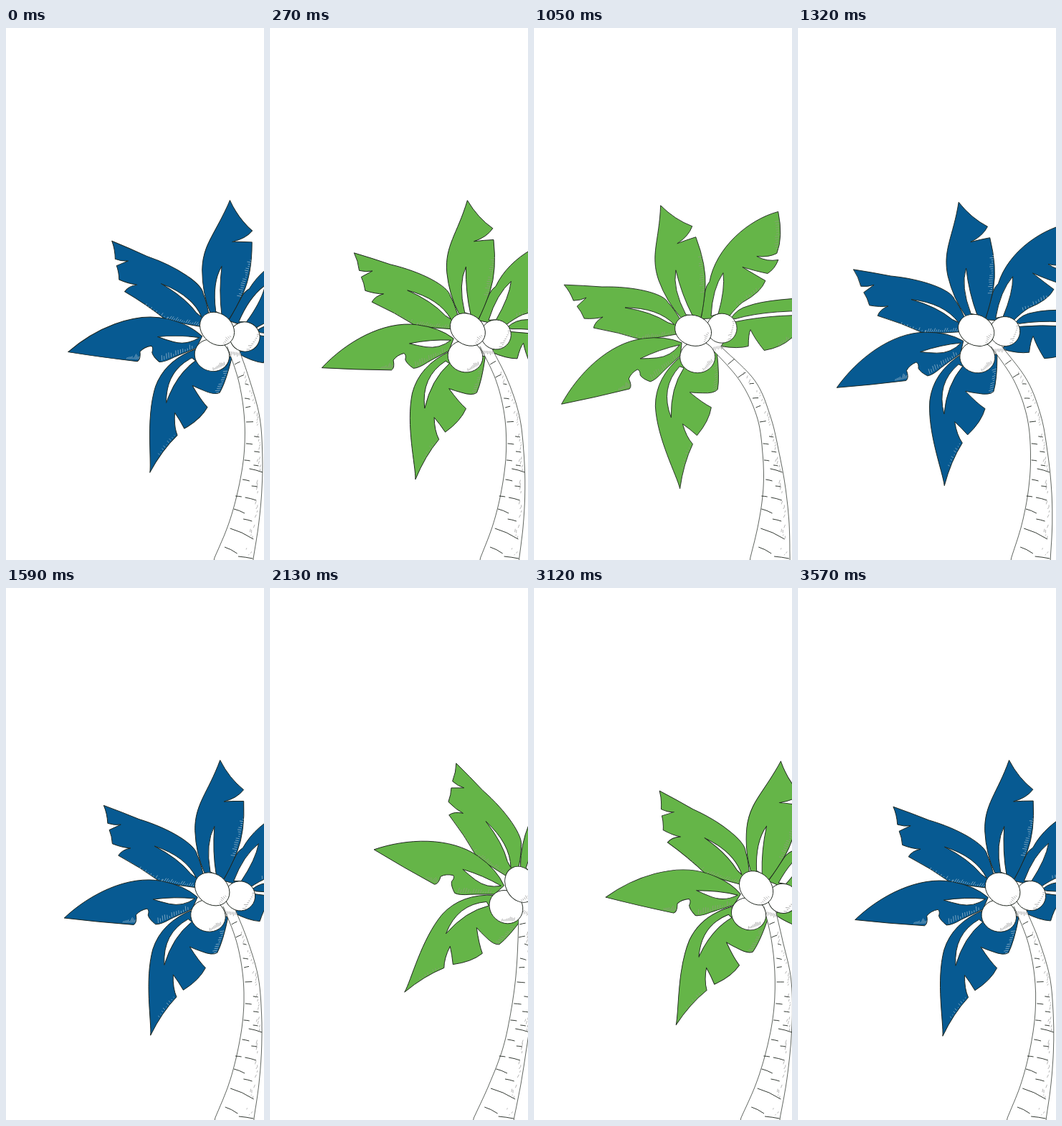
Recreate the animation shown at these times as an HTML page. Size 360 px wide and 740 px high, loop 3600 ms.

```html
<!DOCTYPE html>
<html lang="en">
<head>
<meta charset="utf-8">
<title>Swaying palm</title>
<style>
  html, body { margin: 0; width: 100%; height: 100%; overflow: hidden; background: #fff; }
  svg { display: block; width: 360px; height: 740px; }
  path, ellipse { stroke: #1d241d; stroke-width: .9; stroke-linejoin: round; fill: none; }
  .leaf { fill: var(--leaf); }
  .white { fill: #fff; }
  .hatch { stroke: var(--hatch); stroke-width: .6; }
  .shade { stroke: #858585; stroke-width: .6; }
  svg { --leaf: #65b548; --hatch: #969a86; }
  svg.blue { --leaf: #075a92; --hatch: #b4c8d6; }
</style>
</head>
<body>
<svg id="stage" viewBox="0 0 360 740">
  <g class="crown">
    <path class="leaf" d="M276,403Q284,390 300,386Q330,375 420,374L420,394Q330,390 282,404Z"/>
    <path class="leaf" d="M262,442Q285,446 300,442Q300,425 303,419Q309,432 322,448Q346,444 360,431L420,400Q340,396 282,408Z"/>
    <path class="leaf" d="M204,640C200,622 172,570 170,525Q170,485 207,455L256,450Q260,485 257,502Q252,508 236,507Q228,507 218,506Q236,521 248,527Q245,546 228,566Q218,557 208,550Q213,568 222,578Q209,605 204,640Z"/>
    <path class="white" d="M192,541Q191,500 210,472L204,470Q176,500 192,541Z"/>
    <path class="leaf" d="M43,356Q70,357 96,359C140,358 182,368 188,381Q195,388 204,403L206,424Q180,429 152,433Q118,422 84,416Q86,407 97,401Q86,404 71,403Q67,393 61,386L74,374Q66,378 56,378Q51,365 43,356Z"/>
    <path class="white" d="M128,388Q174,388 197,412L188,409Q165,394 128,388Z"/>
    <path class="leaf" d="M39,522C62,480 105,437 153,431Q184,427 207,437L205,455Q186,472 180,478Q170,489 163,491Q152,487 149,482Q149,475 145,474Q136,479 133,487Q138,497 134,501Q85,513 39,522Z"/>
    <path class="white" d="M149,459Q176,446 204,440Q192,456 172,458Q160,459 149,459Z"/>
    <path class="leaf" d="M342,255C300,266 255,305 246,352Q241,358 240,365L234,404L272,402Q283,388 292,381Q318,367 324,351Q310,343 292,332Q312,338 327,341Q337,335 342,322Q326,325 312,317Q328,319 340,313Q349,290 342,255Z"/>
    <path class="white" d="M265,340Q268,362 258,397L248,400Q250,362 265,340Z"/>
    <path class="leaf" d="M178,246Q198,266 222,275Q217,289 201,299Q214,294 227,290Q242,330 240,360Q238,385 234,402L206,402Q186,380 175,350C163,315 176,295 178,246Z"/>
    <path class="white" d="M199,336Q207,370 222,399L213,398Q194,362 199,336Z"/>
    <path class="hatch" id="leafHatch"/>
  </g>
  <path class="white" id="trunk" style="stroke-width:.7"/>
  <path id="rings" style="stroke-width:.9"/>
  <path class="shade" id="bark"/>
  <g class="crown">
    <ellipse class="white" cx="263" cy="417" rx="21" ry="20.5"/>
    <ellipse class="white" cx="229" cy="457" rx="24.5" ry="22"/>
    <ellipse class="white" rx="26" ry="21" transform="translate(223 420) rotate(20)"/>
    <path class="shade" id="nutHatch"/>
  </g>
</svg>
<script>
const LOOP = 3600, STEP = 30;
const $ = id => document.getElementById(id);
const stage = $('stage'), crowns = document.querySelectorAll('.crown');

function random(seed) {
  return () => (seed = (seed * 16807) % 2147483647) / 2147483647;
}

// A row of n short strokes (dx, dy) along a straight line
const rnd = random(77);
function hatch([x1, y1, x2, y2, dx, dy, n]) {
  let d = '';
  for (let i = 0; i < n; i++) {
    const k = i / (n - 1), len = .3 + .7 * rnd();
    const x = x1 + (x2 - x1) * k, y = y1 + (y2 - y1) * k;
    d += `M${x.toFixed(1)},${y.toFixed(1)}l${(dx * len).toFixed(1)},${(dy * len).toFixed(1)}`;
  }
  return d;
}

$('leafHatch').setAttribute('d', [
  [119, 503, 134, 498, 1, -9, 9],
  [166, 488, 200, 458, -3, -7, 14],
  [118, 424, 152, 431, 1, -4, 9],
  [153, 431, 202, 424, 2, -7, 18],
  [235, 314, 239, 366, -6, 1, 18],
  [343, 268, 342, 306, -6, 1, 12],
  [285, 385, 316, 364, -2, -5, 10],
  [257, 470, 256, 502, -6, 3, 11],
  [219, 580, 208, 612, -4, -2, 9],
  [343, 442, 356, 433, -1, -6, 7]
].map(hatch).join(''));

$('nutHatch').setAttribute('d', [
  [281, 407, 276, 431, -6, 2, 9],
  [245, 424, 240, 436, -5, -2, 6],
  [250, 464, 238, 476, -3, -6, 9],
  [251, 443, 266, 440, 1, 6, 8]
].map(hatch).join(''));

// Trunk edges, every 50px from y = 440, for leaning left, upright and leaning right
const LEAN = [-17.3, 0, 25];
const LEFT = [
  [243, 287, 311, 319, 320, 313, 301],
  [300, 320, 330, 331, 324, 311, 291],
  [347, 346, 343, 336, 325, 306, 283]
];
const RIGHT = [
  [258, 308, 330, 342, 351, 356, 357],
  [315, 336, 351, 356, 356.5, 353, 346],
  [363, 364, 367, 365, 358, 350, 340]
];

const weights = a => LEAN.map((p, i) =>
  LEAN.reduce((w, q, j) => i === j ? w : w * (a - q) / (p - q), 1));

function edge(side, y, w) {
  const s = Math.min(5.999, (y - 440) / 50), i = Math.floor(s), f = s - i;
  const at = k => {
    if (k < 0) return 2 * at(0) - at(1);
    if (k > 6) return 2 * at(6) - at(5);
    return side.reduce((sum, row, n) => sum + row[k] * w[n], 0);
  };
  const [p, q, r, t] = [i - 1, i, i + 1, i + 2].map(at);
  return q + f * (r - p + f * (2 * p - 5 * q + 4 * r - t + f * (3 * (q - r) + t - p))) / 2;
}

// Bark lines: y, start and end across the trunk, drop
const RINGS = [
  [468, .1, .6, -2], [486, .05, .55, -2], [495, .5, .8, 2], [515, .2, .6, 2],
  [528, .15, .5, -1], [548, .1, .55, 0], [568, .55, .85, 1], [578, .08, .45, 1],
  [589, .55, .85, 1], [601, .05, .35, 1], [608, .55, .8, 1], [613, .35, 1, 5],
  [628, .1, .42, 2], [637, .55, .8, 1], [651, -.05, .2, 1], [653, .35, .8, 4],
  [669, .02, .42, 6], [683, .45, .75, 3], [696, .1, .85, 15], [722, .15, .5, 9],
  [735, .6, .98, 3]
];

const barkRnd = random(412);
const BARK = Array.from({ length: 64 }, (_, i) => {
  const y = 478 + i * 4 + barkRnd() * 3;
  return { y, u: .74 + .2 * barkRnd(), dx: 2 * barkRnd() - 2, dy: 1 + 4 * barkRnd() };
}).filter(b => Math.sin(b.y / 5) > -.5);

function drawTrunk(a) {
  const w = weights(a);
  const left = [], right = [];
  for (let y = 443; y <= 743; y += 6) {
    left.push(`${edge(LEFT, y, w).toFixed(1)},${y}`);
    right.unshift(`${edge(RIGHT, y, w).toFixed(1)},${y}`);
  }
  $('trunk').setAttribute('d', 'M' + left.concat(right).join('L'));
  const across = (u, y) => {
    const l = edge(LEFT, y, w);
    return l + (edge(RIGHT, y, w) - l) * u;
  };
  // Rings stay square to the trunk where it leans
  const slope = y => (edge(LEFT, y + 10, w) - edge(LEFT, y, w)) / 10;
  $('rings').setAttribute('d', RINGS.map(([y, u, v, dy]) => {
    const x1 = across(u, y), x2 = across(v, y);
    const end = y + dy - (y < 560 ? slope(y) * (x2 - x1) * .7 : 0);
    return `M${x1.toFixed(1)},${y}Q${((x1 + x2) / 2).toFixed(1)},${((y + end) / 2 - Math.abs(dy) * .2).toFixed(1)} ${x2.toFixed(1)},${end.toFixed(1)}`;
  }).join(''));
  $('bark').setAttribute('d', BARK.map(b =>
    `M${across(b.u, b.y).toFixed(1)},${b.y.toFixed(1)}l${b.dx.toFixed(1)},${b.dy.toFixed(1)}`).join(''));
}

// Sway: time in ms, angle in degrees
const SWAY = [
  [0, 2.9], [540, -8.6], [1025, -17.5], [1590, .7], [2130, 25],
  [2220, 26.6], [2700, 15.5], [3120, 8.2], [3600, -.5]
];
const TANGENTS = SWAY.map(([t, v], i) => {
  const [t0, v0] = SWAY[Math.max(0, i - 1)], [t1, v1] = SWAY[Math.min(SWAY.length - 1, i + 1)];
  const turning = (v - v0) * (v1 - v) < 0;
  return turning ? 0 : (v1 - v0) / (t1 - t0);
});

function angleAt(t) {
  const i = SWAY.findIndex((k, n) => n === SWAY.length - 1 || t < SWAY[n + 1][0]);
  const [t0, v0] = SWAY[i], [t1, v1] = SWAY[i + 1], d = t1 - t0, s = (t - t0) / d;
  const r = 1 - s;
  return v0 * (1 + 2 * s) * r * r + v1 * s * s * (3 - 2 * s)
    + d * s * r * (TANGENTS[i] * r - TANGENTS[i + 1] * s);
}

const BLUE = [[0, 270], [1320, 1860], [3345, 3600]];

function render(time) {
  const t = Math.floor((time % LOOP) / STEP) * STEP;
  const a = angleAt(t);
  const x = 285.5 + 3.2 * a - .025 * a * a;
  const y = 419 - .17 * a - .004 * a * a;
  const move = `translate(${x} ${y}) rotate(${a + 17.3}) translate(-223 -420)`;
  crowns.forEach(g => g.setAttribute('transform', move));
  drawTrunk(a);
  stage.classList.toggle('blue', BLUE.some(([from, to]) => t >= from && t < to));
}

const start = performance.now();
function tick() {
  render(performance.now() - start);
  requestAnimationFrame(tick);
}
tick();
</script>
</body>
</html>
```
